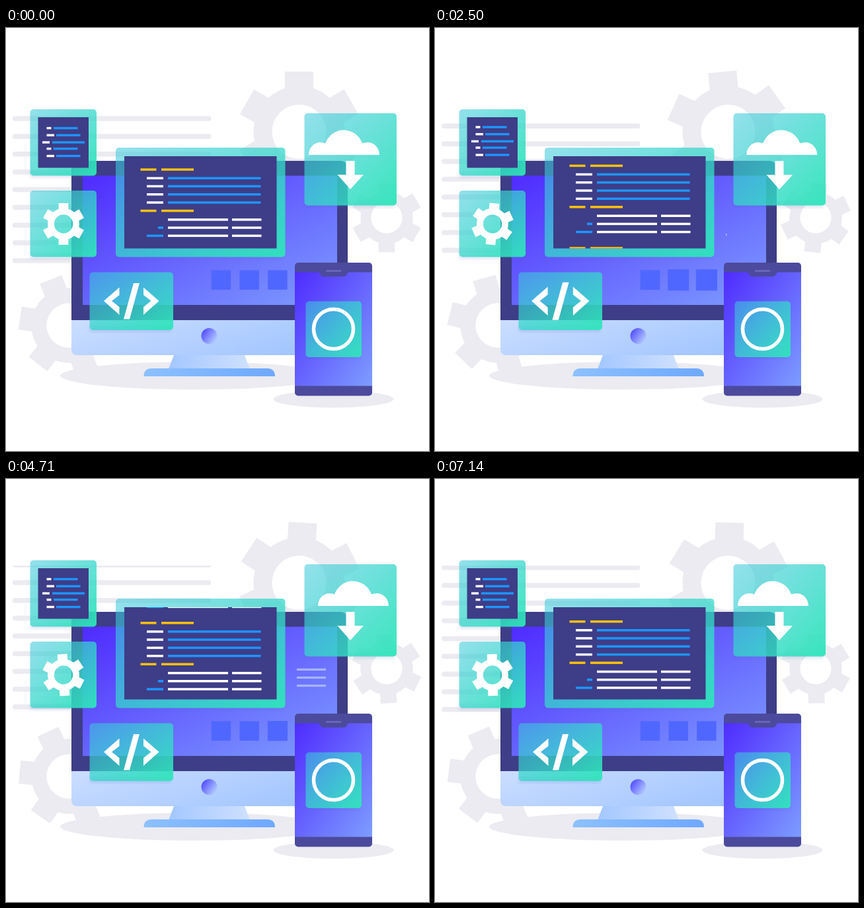
These frames come from a looping animation (640 by 640 pixels, 7.21 s). An HTML page:

```html
<!DOCTYPE html>
<html lang="en">
<head>
<meta charset="utf-8">
<title>Development illustration</title>
<style>
  html, body { margin: 0; width: 100%; height: 100%; overflow: hidden; background: #fff; }
  svg { display: block; width: 100%; height: 100%; }
</style>
</head>
<body>
<svg viewBox="0 0 640 640">
  <defs>
    <linearGradient id="glass" x2="1" y2="1">
      <stop stop-color="#3cc8dc" stop-opacity=".55"/>
      <stop offset="1" stop-color="#2ee6b9" stop-opacity=".95"/>
    </linearGradient>
    <linearGradient id="screen" x2="1" y2="1">
      <stop stop-color="#4f2bff"/><stop offset="1" stop-color="#7d9dff"/>
    </linearGradient>
    <linearGradient id="chin" x2="1" y2=".4">
      <stop stop-color="#cbdeff"/><stop offset="1" stop-color="#a3c6ff"/>
    </linearGradient>
    <linearGradient id="neck" x2="1">
      <stop stop-color="#a3c7ff"/><stop offset="1" stop-color="#cfe0ff"/>
    </linearGradient>
    <linearGradient id="foot" x2="1">
      <stop stop-color="#8dc0ff"/><stop offset="1" stop-color="#6ea8ff"/>
    </linearGradient>
    <linearGradient id="button" x2="1" y2=".7">
      <stop offset=".1" stop-color="#5048ff"/><stop offset="1" stop-color="#b4ccff"/>
    </linearGradient>
    <filter id="blur" x="-20%" y="-20%" width="140%" height="140%"><feGaussianBlur stdDeviation="2.5"/></filter>
    <clipPath id="speedClip"><path d="M0 131H320V356.5H0z"/></clipPath>
    <clipPath id="codeClip"><path d="M179 194H409.5V333.5H179z"/></clipPath>
    <clipPath id="miniClip"><path d="M48.5 135H125V211.5H48.5z"/></clipPath>
    <g id="gear">
      <circle r="55" fill="none" stroke="currentColor" stroke-width="28"/>
      <g id="teeth" fill="currentColor"></g>
    </g>
  </defs>

  <g fill="#ebebf1" color="#ebebf1">
    <ellipse cx="285" cy="526" rx="203" ry="21"/>
    <ellipse cx="495.5" cy="561.5" rx="91" ry="13"/>
    <g clip-path="url(#speedClip)"><g id="speed"></g></g>
    <use href="#gear" id="gearTop"/>
    <use href="#gear" id="gearRight"/>
    <use href="#gear" id="gearLeft"/>
  </g>

  <!-- monitor -->
  <path d="M99 443V213q0-12 12-12H505q12 0 12 12V443z" fill="#3e3d87"/>
  <path d="M99 442H517V486q0 9-9 9H108q-9 0-9-9z" fill="url(#chin)"/>
  <path d="M116 223.500H501V419H116z" fill="url(#screen)"/>
  <path d="M254 495H361L369 516H246z" fill="url(#neck)"/>
  <path d="M208.500 527q0-12 12-12H395q12 0 12 12z" fill="url(#foot)"/>
  <circle cx="307.500" cy="466" r="12" fill="url(#button)"/>
  <g id="squares" fill="#5067ff"></g>
  <g id="notes" fill="#a8b5ff"></g>

  <!-- phone -->
  <rect x="437" y="355" width="117" height="201.500" rx="5" fill="#4c4a9c"/>
  <path d="M437 369.500H554V541.500H437z" fill="url(#screen)"/>
  <path d="M470 369q4 0 5 3q1 4 6 4h29q5 0 6-4q1-3 5-3z" fill="#4c4a9c"/>
  <path d="M485 367.500H506" stroke="#6e69bd" stroke-width="2.500" stroke-linecap="round"/>

  <g id="panels"></g>

  <path d="M179 194H409.500V333.500H179zM48.500 135H125V211.500H48.500z" fill="#3e3d87"/>
  <g clip-path="url(#codeClip)"><g id="code"></g></g>
  <g clip-path="url(#miniClip)"><g id="mini"></g></g>

  <g fill="#fff" color="#fff">
    <use href="#gear" id="gearIcon"/>
    <path id="cloud" d="M458 192c0-11 8-19 18-19q4 0 7 1.500c5-12 15-20 27-20c14 0 25 8 29 20q3-1.500 8-1.500c10 0 18 8 18 19z"/>
    <path id="arrow" d="M514.500 201h13v21H541L521 244L501.500 222h13z"/>
    <path id="tag" d="M-42 0L-18.500-20.500V-9L-30 0L-18.500 9V21zM3-27H12L-3 27.500H-12zM18-20.500L41.500 0L18 21V9L29.500 0L18-9z"/>
  </g>
  <g fill="none" stroke="#fff">
    <circle cx="495.500" cy="455.500" r="30" stroke-width="5.500"/>
    <path id="check" d="M484.800 455.500L493.500 463.500L506.800 447.800" stroke-width="6.500" pathLength="1"/>
  </g>
</svg>
<script>
const LOOP = 7210;
const TURN = 7170;          // one full gear revolution
const SCROLL = TURN / 3;    // scrolling, arrow and check mark
const SWAY = TURN / 2;      // cloud, notes, tag and mini code
const PULSE = TURN / 4;     // squares
const CODE_HEIGHT = 124.6;
const SPEED_HEIGHT = 243.3;
const WHITE = '#fff', BLUE = '#1c96ff', YELLOW = '#ffc20a';

const $ = id => document.getElementById(id);
const move = (id, transform) => $(id).setAttribute('transform', transform);
const range = n => [...Array(n).keys()];
const bar = (x1, x2, y, h, fill = '') =>
  `<rect x="${x1}" y="${y - h / 2}" width="${x2 - x1}" height="${h}" ${fill && `fill="${fill}"`}/>`;

function build() {
  $('teeth').innerHTML = range(6).map(i =>
    `<path d="M-21.500-91H21.500V-60H-21.500z" transform="rotate(${i * 60})"/>`).join('');

  $('speed').innerHTML = range(18).map(i => {
    const y = 137 + (i % 9) * 26.85 - (i > 8 ? SPEED_HEIGHT : 0);
    return `<rect x="10" y="${y - 3.75}" width="300.500" height="7.500" rx="3.750"/>`;
  }).join('');

  $('panels').innerHTML = [
    [36.5, 123, 100.5, 100.5], [36.5, 246, 100.5, 100.5], [166, 181, 256.5, 165.5],
    [451.5, 129, 139.5, 139.5], [126.5, 369.5, 126.5, 87.5], [453.5, 413.5, 84.5, 84.5]
  ].map(([x, y, w, h]) => `
    <rect x="${x}" y="${y + h - 6}" width="${w - 3}" height="9" fill="#5560c0" opacity=".16" filter="url(#blur)"/>
    <rect x="${x}" y="${y}" width="${w}" height="${h}" rx="5" fill="url(#glass)"/>`).join('');

  const heading = y => bar(203.5, 227.5, y, 3.5, YELLOW) + bar(235, 284, y, 3.5, YELLOW);
  const statement = y => bar(213, 238, y, 3.5, WHITE) + bar(245, 385.5, y, 3.5, BLUE);
  const value = (y, i) => bar(245, 336, y, 3.5, WHITE) + bar(342, 386.5, y, 3.5, WHITE) +
    (i ? bar(i === 1 ? 230 : 213, 238, y, 3.5, BLUE) : '');
  const block = heading(214.2) + [227.3, 239.5, 251.8, 264.1].map(statement).join('') +
    heading(276.6) + [290, 302.2, 314.4].map(value).join('');
  $('code').innerHTML = range(3).map(i =>
    `<g transform="translate(0 ${i * CODE_HEIGHT})">${block}</g>`).join('');

  $('mini').innerHTML = [
    [61.5, 68.5, 72, 108.5, 151.5], [61.5, 73, 76, 112.5, 162.2], [55, 66, 70, 119, 173],
    [61.5, 68.5, 72, 108.5, 182.6], [61.5, 73, 76, 112.5, 193.6]
  ].map(([a, b, c, d, y]) => bar(a, b, y, 3.4, WHITE) + bar(c, d, y, 3.4, BLUE)).join('');

  $('squares').innerHTML = '<rect/>'.repeat(3);
  $('notes').innerHTML = range(3).map(i => bar(440, 484, 288.3 + i * 12.2, 3.2)).join('');
}

const clamp = x => Math.min(1, Math.max(0, x));
const progress = (t, start, length) => clamp((t - start) / length);
const ease = x => x * x * (3 - 2 * x);
const eased = (t, start, length) => ease(progress(t, start, length));
const hump = (t, start, length) => Math.sin(Math.PI * progress(t, start, length));
const swing = (t, period) => (1 - Math.cos(2 * Math.PI * t / period)) / 2;

function placeGear(id, x, y, scale, angle) {
  move(id, `translate(${x} ${y}) rotate(${angle}) scale(${scale})`);
}

function draw(t) {
  const angle = t / TURN * 360;
  placeGear('gearTop', 443.5, 157, 1, -angle);
  placeGear('gearRight', 576, 287, .575, angle);
  placeGear('gearLeft', 95, 450, .82, angle - 21.5);
  placeGear('gearIcon', 87, 296.5, .346, angle);

  const scroll = t % SCROLL, sway = t % SWAY, pulse = t % PULSE;
  move('speed', `translate(0 ${scroll / SCROLL * SPEED_HEIGHT})`);
  move('code', `translate(0 ${-scroll / SCROLL * CODE_HEIGHT})`);
  move('cloud', `translate(${20 * swing(t, SWAY)} 0)`);
  move('arrow', `translate(0 ${13 * swing(t, SCROLL)})`);
  move('mini', `translate(0 ${9.2 * Math.sin(2 * Math.PI * progress(sway, 1500, 1900))})`);
  move('tag', `translate(190 413) scale(${1 + .081 * hump(sway, 1500, 1250)})`);

  [...$('squares').children].forEach((square, i) => {
    const size = 29.5 + 3 * hump(pulse, 20 + 220 * i, 720);
    square.setAttribute('x', 325.5 + i * 42.7 - size / 2);
    square.setAttribute('y', 381.2 - size / 2);
    square.setAttribute('width', size);
    square.setAttribute('height', size);
  });

  [...$('notes').children].forEach((note, i) => {
    const shown = eased(sway, 400 + 100 * i, 400) - eased(sway, 1920 + 100 * i, 430);
    note.setAttribute('width', 44 * Math.max(0, shown));
  });

  const drawn = eased(scroll, 350, 500) - eased(scroll, 1600, 500);
  $('check').setAttribute('stroke-dasharray', `${drawn} 2`);
  $('check').style.visibility = drawn > .001 ? 'visible' : 'hidden';
}

function tick() {
  draw(performance.now() % LOOP);
  requestAnimationFrame(tick);
}

build();
tick();
</script>
</body>
</html>
```
